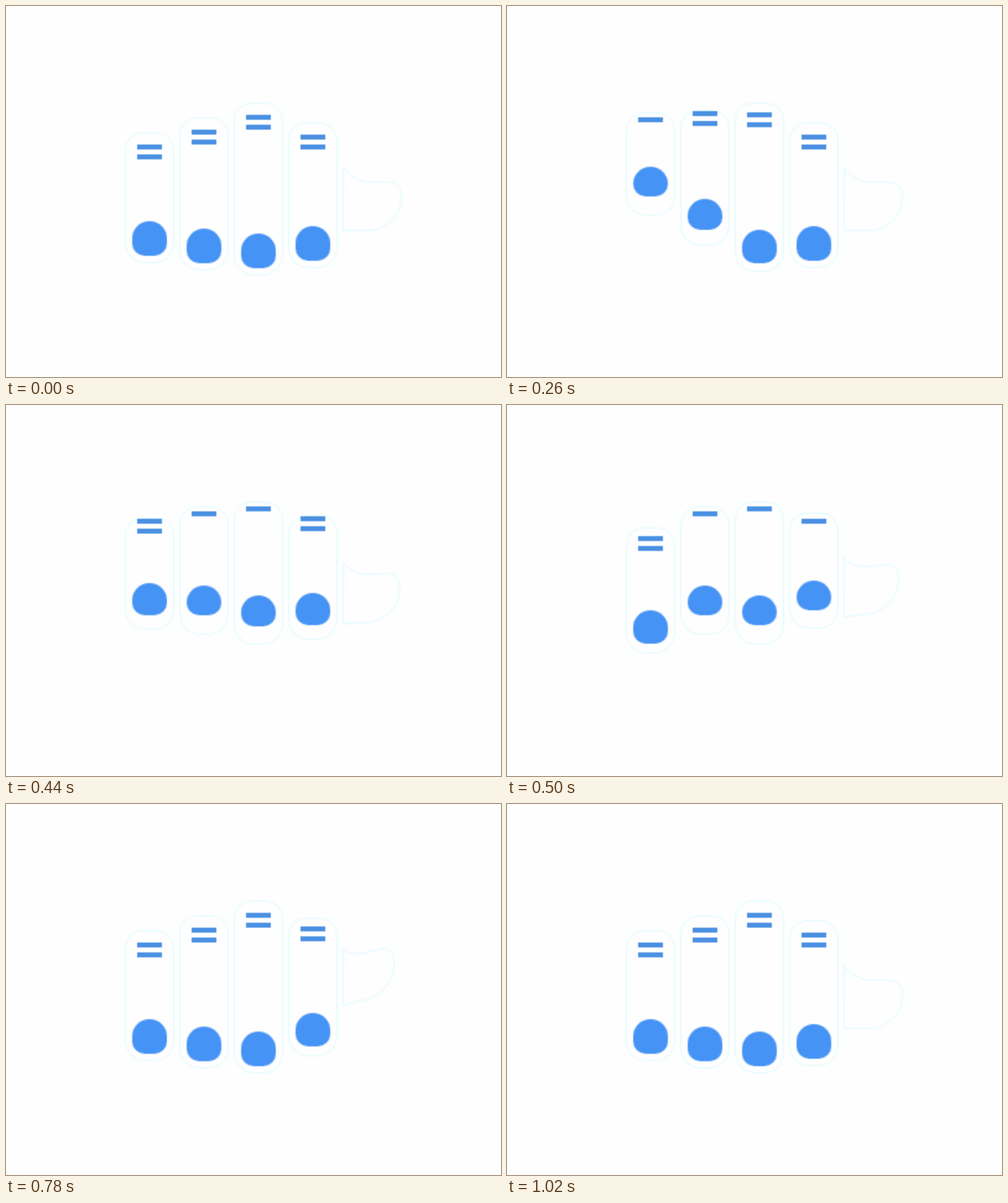
Write an HTML page with a canvas that moves like this. It is 800 px wide and 600 px high and loops after 1.3 s.

```html
<!DOCTYPE html>
<html lang="en">
<head>
<meta charset="utf-8">
<title>Tapping fingers</title>
<style>
  html, body { margin: 0; height: 100%; overflow: hidden; background: #fefefe; }
  canvas { display: block; width: 800px; height: 600px; }
</style>
</head>
<body>
<canvas id="stage" width="400" height="300"></canvas>
<script>
// Drawn at half size and enlarged, which gives the soft edges
const ctx = document.getElementById('stage').getContext('2d');
ctx.scale(0.5, 0.5);

const LOOP = 1300, PERIOD = 2400, OFFSET = 426.4;
const WHITE = '#fefefe', EDGE = '#e2fcff', LINE = '#4a90e2', NAIL = '#4593f5';
const TOP = 156, BOTTOM = 436;

// Insets from TOP and BOTTOM, at rest and pressed
const fingers = [
  { rest: [48, 20], press: [16, 96] },
  { rest: [24, 8], press: [8, 64] },
  { rest: [0, 0], press: [0, 48] },
  { rest: [32, 12], press: [16, 80] }
];

const lerp = (a, b, k) => a + (b - a) * k;
const snap = v => Math.round(v / 2) * 2;
const linear = x => x;

// cubic-bezier(0, 0, .58, 1)
function easeOut(x) {
  let lo = 0, hi = 1;
  for (let i = 0; i < 24; i++) {
    const s = (lo + hi) / 2;
    if (1.74 * (1 - s) * s * s + s ** 3 < x) lo = s; else hi = s;
  }
  return lo * lo * (3 - 2 * lo);
}

// Goes 0 -> 1 over a..b, holds until c, returns to 0 at d
function pulse(p, a, b, c, d, ease) {
  if (p <= a || p >= d) return 0;
  if (p < b) return ease((p - a) / (b - a));
  if (p <= c) return 1;
  return 1 - ease((p - c) / (d - c));
}

function rect(x, y, w, h, color) {
  ctx.fillStyle = color;
  ctx.fillRect(x, y, w, h);
}

function round(x, y, w, h, upper, lower) {
  ctx.beginPath();
  ctx.roundRect(x, y, w, h, [upper, upper, lower, lower]);
}

function outline() {
  ctx.strokeStyle = EDGE;
  ctx.lineWidth = 2;
  ctx.stroke();
}

function drawFinger(x, { rest, press }, k) {
  const tip = TOP + lerp(rest[0], press[0], k);
  const end = BOTTOM - lerp(rest[1], press[1], k);
  const top = snap(tip), bottom = snap(end);
  ctx.save();
  round(x, top, 80, bottom - top, 28, 32);
  ctx.clip();
  round(x + 1, top + 1, 78, bottom - top - 2, 27, 31);
  outline();

  // The upper crease turns white once it reaches the fingertip
  const y = snap(tip + 20 - 28 * k);
  const hidden = y <= top;
  rect(x + 20, y, 40, 8, hidden ? WHITE : LINE);
  if (hidden) rect(x + 20, y + 6, 40, 2, EDGE);
  rect(x + 20, y + 16, 40, 8, LINE);

  const base = end - lerp(12, 32, k);
  const nailTop = snap(base - lerp(56, 48, k));
  round(x + 12, nailTop, 56, snap(base) - nailTop, 28, 20);
  ctx.fillStyle = NAIL;
  ctx.fill();
  ctx.restore();
}

function drawThumb(k) {
  // Shrinks the thumb towards its root and bends its tip upwards
  const point = (x, y) => {
    const u = (x - 545) / 94, v = (y - 261) / 102;
    const bend = 28 * u * (2 - u) * (1 - v / 2);
    ctx.lineTo(x - 12 * u * k, y - (26 + 13 * v + bend) * k);
  };
  const arc = (cx, cy, r, from, to) => {
    for (let i = 0; i <= 16; i++) {
      const a = lerp(from, to, i / 16);
      point(cx + r * Math.cos(a), cy + r * Math.sin(a));
    }
  };
  ctx.beginPath();
  arc(590, 231, 54, 2.55, Math.PI / 2);
  arc(619, 305, 20, -Math.PI / 2, 0);
  arc(585, 309, 54, 0, Math.PI / 2);
  point(545, 363);
  ctx.closePath();
  outline();
}

function draw(time) {
  const p = (time % LOOP + OFFSET) / PERIOD * 100;
  rect(0, 0, 800, 600, WHITE);
  fingers.forEach((finger, i) => {
    const s = 20 + 4 * i;
    drawFinger(192 + 88 * i, finger, pulse(p, s, s + 9, s + 14.9, s + 20.8, easeOut));
  });
  drawThumb(pulse(p, 34, 43, 50, 60, linear));
}

const start = performance.now();
function tick() {
  draw(performance.now() - start);
  requestAnimationFrame(tick);
}
tick();
</script>
</body>
</html>
```
